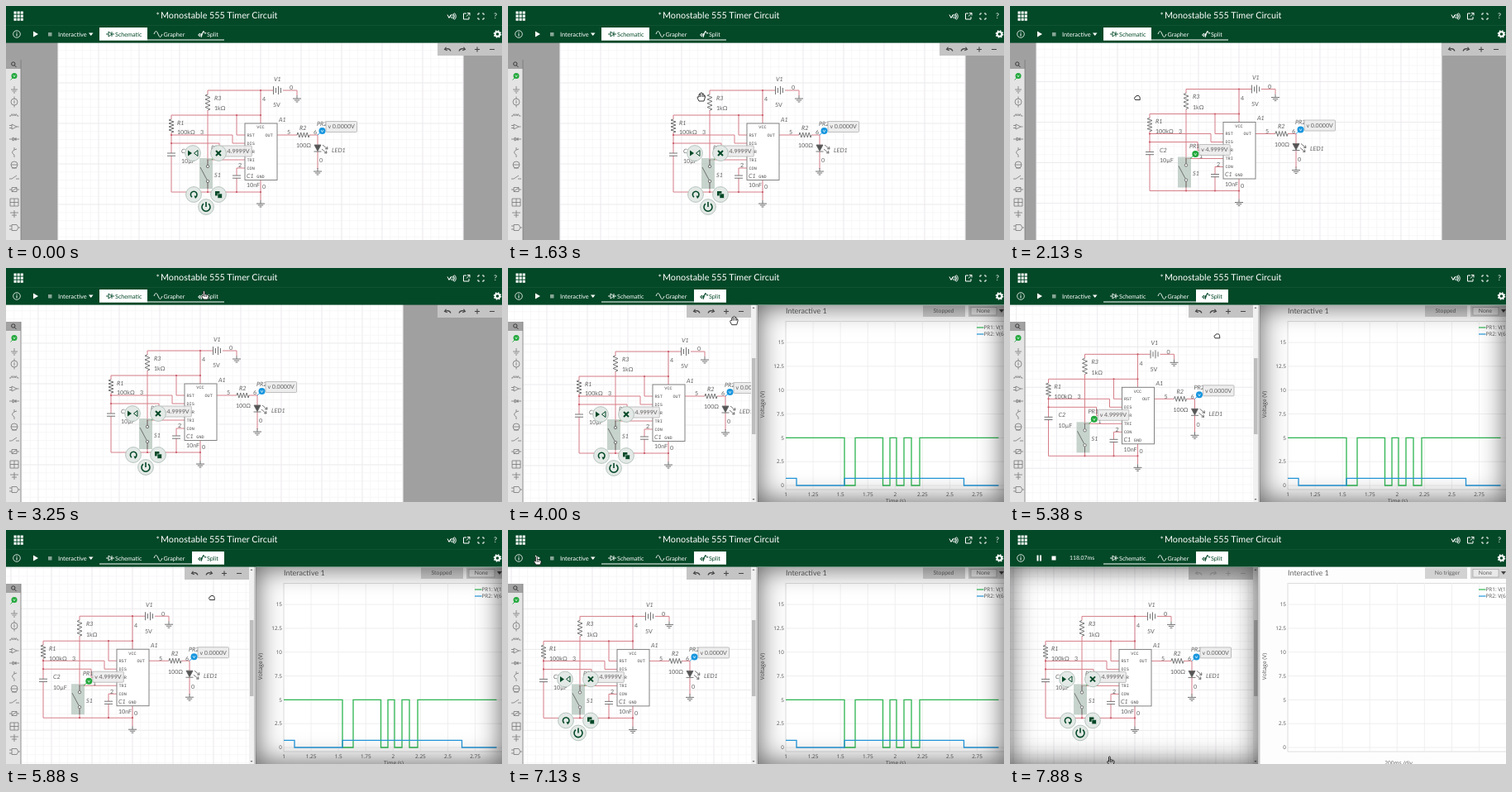
Write an HTML page that moves like this. It is 600 px wide and 283 px high and loops after 8000 ms.

```html
<!DOCTYPE html>
<html lang="en">
<head>
<meta charset="utf-8">
<title>Monostable 555 Timer Circuit</title>
<style>
  html, body { margin: 0; width: 100%; height: 100%; overflow: hidden; background: #a0a0a0; }
  svg { display: block; width: 100vw; height: 100vh; }
  text { font: 7.3px Lato, "Open Sans", sans-serif; fill: #626262; text-rendering: geometricPrecision; }
  .name { font-style: italic; }
  .pin { font: 5.2px "Liberation Mono", "DejaVu Sans Mono", monospace; fill: #4c4c4c; }
  .tick { font: 6.4px "Open Sans", Lato, sans-serif; fill: #555; }
  .light { fill: #fff; }
  .line { fill: none; stroke: #666; stroke-width: .9; }
  .wire { fill: none; stroke: #d67f89; stroke-width: 1; }
  .icon { fill: none; stroke: #fff; stroke-width: 1; }
  .part { fill: none; stroke: #777; stroke-width: .8; }
  .tool { fill: none; stroke: #444; stroke-width: 1.1; }
  .run .tool { stroke: #a4a4a4; }
  .button { fill: #e3e9e6; stroke: #a9b9b1; stroke-width: .8; }
  .mark { fill: none; stroke: #034827; stroke-width: 1.6; }
  .dark { fill: #034827; }
  .tab rect { fill: none; }
  .tab text { fill: #fff; }
  .tab path { fill: none; stroke: #fff; stroke-width: .9; }
  .tab.on rect { fill: #fff; }
  .tab.on text { fill: #034827; }
  .tab.on path { stroke: #034827; }
  .hand path { fill: #fff; stroke: #222; stroke-width: .9; stroke-linejoin: round; }
  .drag .menu, svg:not(.split) .graph, svg:not(.split) + .shade,
  .run .idle, svg:not(.run) .busy { display: none; }
  /* The pane without focus is shaded along its edges. */
  .shade { position: absolute; left: 302px; right: 0; top: 44.5px; bottom: 0;
    box-shadow: inset 0 0 32px rgba(0, 0, 0, .65); }
  .run + .shade { left: 0; right: 300px; }
</style>
</head>
<body>
<svg id="stage" viewBox="0 0 600 283"></svg>
<div class="shade"></div>
<script>
const stage = document.getElementById('stage');
const LOOP = 8000, STEP = 125;
const SPLIT_AT = 3500, RUN_AT = 7375;

// Markup helpers; text is centred vertically on y.
const text = (x, y, s, cls = '', size = 7.3, anchor = 'start') =>
  `<text x="${x}" y="${y + size * .35}" class="${cls}" text-anchor="${anchor}" style="font-size:${size}px">${s}</text>`;
const path = (d, cls, extra = '') => `<path d="${d}" class="${cls}" ${extra}/>`;
const rect = (x, y, w, h, fill, extra = '') =>
  `<rect x="${x}" y="${y}" width="${w}" height="${h}" fill="${fill}" ${extra}/>`;
const disc = (x, y, r, fill, extra = '') => `<circle cx="${x}" cy="${y}" r="${r}" fill="${fill}" ${extra}/>`;
const group = (cls, body, extra = '') => `<g class="${cls}" ${extra}>${body}</g>`;
const range = (n, f) => Array.from({ length: n }, (_, i) => f(i)).join('');

function resistor(x, y, length, vertical) {
  const step = length / 8;
  let d = `M${x} ${y}`;
  for (let i = 0; i < 8; i++) {
    const along = (i + .5) * step, side = i % 2 ? 3 : -3;
    d += vertical ? `L${x + side} ${y + along}` : `L${x + along} ${y + side}`;
  }
  return path(d + (vertical ? `L${x} ${y + length}` : `L${x + length} ${y}`), 'line');
}

const ground = (x, y) =>
  path(`M${x} ${y - 4}V${y}M${x - 5} ${y}h10M${x - 3.2} ${y + 2}h6.4M${x - 1.4} ${y + 4}h2.8`, 'line');

const capacitor = (x, y) => path(`M${x - 5} ${y}h10M${x - 5} ${y + 3.2}h10`, 'line');

function probe(x, y, tipX, tipY, color, value) {
  const tag = rect(x + 4.5, y - 11.5, 37.5, 13, '#ececec', 'fill-opacity=".9" stroke="#aaa" stroke-width=".7" rx="1"');
  return path(`M${x} ${y}L${tipX} ${tipY}`, 'line', `style="stroke:${color}"`) + tag +
    text(x + 7, y - 5, `v ${value}`, '', 7.1) + disc(x, y, 4, color) +
    path(`M${x - 1.4} ${y - 1}l1.4 2.6l1.4 -2.6`, 'icon', 'style="stroke-width:.7"');
}

function page() {
  const cell = 9.8;
  const lines = (every, color) => {
    let d = '';
    for (let i = 0; i <= 50; i += every) d += `M${63 + i * cell} -60V400`;
    for (let y = -5; y < 400; y += cell * every) d += `M63 ${y}H553`;
    return path(d, '', `stroke="${color}" stroke-width=".7"`);
  };
  return rect(63, -60, 490, 460, '#fff') + lines(1, '#f6f4f6') + lines(5, '#e9e7ea');
}

function circuit() {
  const wires = path('M323 102H244V107M308 102V142M200 132H308M279 132V156H289M200 132V137' +
    'M244 126V192M244 186H289M200 153V178M200 156H274V166H289M200 166H258V176H289' +
    'M200 181V225H308M308 210V235M289 196H279V205M279 208V225M244 214V225' +
    'M328 156H352M367 156H377V168M377 176V197M335 102H352V108', 'wire');
  const dots = [[308, 102], [308, 132], [279, 132], [200, 156], [200, 166], [244, 186], [279, 225], [244, 225], [308, 225]]
    .map(([x, y]) => disc(x, y, 1.1, '#cc5a68')).join('');
  const parts = resistor(244, 107, 19, true) + resistor(200, 137, 16, true) + resistor(352, 156, 15, false) +
    capacitor(200, 178) + capacitor(279, 205) +
    ground(352, 112) + ground(308, 239) + ground(377, 200) +
    path('M323.5 97V107M326.5 99V105M329.5 97V107M332.5 99V105', 'line') +
    path('M373 168H381L377 175.5ZM372.5 176H381.5', 'line', 'style="fill:#555"') +
    path('M383 168l6 5m-3 -.3l3 .3l-.5 -3M382 173l6 5m-3 -.3l3 .3l-.5 -3', 'line');
  const chip = rect(289, 142, 39, 68.5, '#fff', 'stroke="#777" stroke-width=".9"') +
    ['RST', 'DIS', 'THR', 'TRI', 'CON'].map((s, i) => text(291.5, 156 + i * 10, s, 'pin', 5.2)).join('') +
    text(308, 146.5, 'VCC', 'pin', 5.2, 'middle') + text(308, 206, 'GND', 'pin', 5.2, 'middle') +
    text(313.5, 156, 'OUT', 'pin', 5.2);
  const toggle = rect(234, 184, 16, 37, '#a9bdb2', 'fill-opacity=".65"') +
    path('M235 195L243 210M244 186V192M244 214V221', 'line') +
    disc(244, 194, 1.7, '#fff', 'stroke="#555" stroke-width=".8"') +
    disc(244, 212, 1.7, '#fff', 'stroke="#555" stroke-width=".8"');
  const names = [[324, 88, 'V1'], [252, 111, 'R3'], [207, 141, 'R1'], [212, 175.5, 'C2'], [252, 204, 'S1'],
    [291, 205, 'C1'], [330, 137, 'A1'], [355, 147, 'R2'], [394, 174, 'LED1'], [376, 142, 'PR2'], [248, 171, 'PR1']]
    .map(([x, y, s]) => text(x, y, s, 'name')).join('');
  const values = [[323, 120, '5V'], [252, 124, '1kΩ'], [207, 153, '100kΩ'], [212, 188, '10µF'], [291, 217, '10nF'],
    [351, 169, '100Ω'], [343, 99, '0'], [310, 113, '4'], [235, 153, '3'], [340, 153, '5'], [372, 153, '6'],
    [281, 193, '2'], [310, 219, '0'], [379, 187, '0'], [260, 183, '1']]
    .map(([x, y, s]) => text(x, y, s, '', 7.1)).join('');
  return wires + dots + parts + chip + toggle + names + values +
    probe(255.3, 180.5, 249, 186, '#22a83c', '4.9999V') +
    probe(382.5, 151, 377, 156, '#1796de', '0.0000V');
}

function menu() {
  const base = [[226, 178], [257, 178], [227, 228], [257, 228], [242, 243]]
    .map(([x, y]) => disc(x, y, 9.4, '', 'class="button"')).join('');
  return group('menu', base +
    path('M220 174.5V181.5L225 178Z', 'dark') + path('M232 174.5V181.5L227.5 178Z', 'mark', 'style="stroke-width:1"') +
    path('M254 175l6 6M260 175l-6 6', 'mark', 'style="stroke-width:2"') +
    path('M225 231.2A3.8 3.8 0 1 1 229.4 231.2', 'mark') + path('M227.5 229.5l4 .4l-2.4 3.2Z', 'dark') +
    rect(253, 224, 5.4, 5.4, '#034827') + rect(256, 227, 5.4, 5.4, '#034827', 'stroke="#e3e9e6" stroke-width=".6"') +
    path('M239 239.2A5 5 0 1 0 245 239.2M242 237V243', 'mark'));
}

function sidebar() {
  const shapes = ['M10 97v4M6 101h8M7.5 103h5M9 105h2', 'M10 109.5v3M10 119.5v3M6 116a4 4 0 1 0 8 0a4 4 0 1 0 -8 0M10 114v4',
    'M4 133h2q1 -5 2.5 0q1 -5 2.5 0q1 -5 2.5 0h2', 'M4 144.5h3M4 147.5h3M7 143l6 3l-6 3zM13 146h2.5',
    'M4 161h12M8 159v4l4 -2zM12 159v4', 'M10 171v3q-5 3 0 6v3M10 174l3 -1',
    'M6 192a4 4 0 1 0 8 0a4 4 0 1 0 -8 0M6 192h8M7 196h6', 'M4 209h3l6 -4M12 209h4', 'M4 222h3M13 222h3M7 219.5h6v5h-6zM7 224l6 -4',
    'M5 233h10v9h-10zM5 237.5h10M10 233v9', 'M5 250h10M7 253h6M10 247v9', 'M4 266h3M4 270h3M7 264.5h6l2 3.5l-2 3.5h-6zM15 268h2'];
  return group('idle', rect(0, 65, 18, 218, '#e4e4e4') + rect(0, 65, 18, 11, '#a2a2a2') + path('M18 65V283', 'part') +
    path('M10 71.5l2.5 2.5M11 70a2.2 2.2 0 1 1 -4.4 0a2.2 2.2 0 1 1 4.4 0', 'line', 'style="stroke:#333"') +
    path('M8 87l-2.500 2.500M8.500 84l1.500 2.500l1.500 -2.500', 'line', 'style="stroke:#22a83c"') +
    disc(10, 84.5, 3.5, '#22a83c') + path('M8.7 83.5l1.300 2.300l1.300 -2.300', 'icon', 'style="stroke-width:.7"') +
    shapes.map(d => path(d, 'part')).join(''));
}

const viewTools = () => group('', rect(522, 44.5, 78, 15.5, '#c4c4c4') +
  path('M538 54.5q-1.5 -4 -6.5 -2.5M532.5 49.7l-2 2.8l3.3 1.2', 'tool') +
  path('M548 54.5q1.5 -4 6.5 -2.5M553.5 49.7l2 2.8l-3.3 1.2', 'tool') +
  path('M567 52.5h6M570 49.5v6M585 52.5h6', 'tool'), 'id="tools"');

function graph() {
  const X = v => 336 + (v - 1) * 132.3, Y = v => 263 - v * 11.53;
  const levels = range(7, i => path(`M336 ${Y(i * 2.5)}H600`, '', 'stroke="#eaeaea" stroke-width=".8"') +
    text(334, Y(i * 2.5), i * 2.5, 'tick', 6.4, 'end'));
  const columns = range(8, i => path(`M${X(1 + i / 4)} 64V268`, '', 'stroke="#ececec" stroke-width=".8"'));
  const times = range(8, i => text(X(1 + i / 4), 274, 1 + i / 4, 'tick', 6.4, 'middle'));
  // Square wave starting high, flipping at each listed x.
  const wave = (high, flips, color) => {
    let level = high, d = `M336 ${high}`;
    for (const x of flips) d += `H${x}V${level = level === high ? 263 : high}`;
    return path(d + 'H593.5', '', `fill="none" stroke="${color}" stroke-width="1.3"`);
  };
  const key = (y, color, label) =>
    path(`M567 ${y}h8.5`, '', `stroke="${color}" stroke-width="1.2"`) + text(575.5, y, label, 'tick', 6.4);
  return group('graph', rect(294, 44, 6.5, 239, '#f1f1f1') + rect(295, 109, 4.5, 92, '#bdbdbd') +
    path('M295.500 49h3l-1.500 -2zM295.500 279h3l-1.500 2z', '', 'fill="#777"') +
    rect(300, 44, 300, 239, '#fdfdfd') + rect(300, 44, 2.5, 239, '#c9c9c9') +
    rect(336, 64.5, 270, 203.5, '#fff', 'stroke="#d4d4d4" stroke-width=".8"') + levels + columns +
    text(336, 52, 'Interactive 1', '', 9) +
    rect(502, 45.5, 51, 13.5, '#d2d2d2') + rect(557, 45.5, 43, 13.5, '#d2d2d2') +
    rect(560, 47.5, 31, 9.5, '#e9e9e9', 'stroke="#999" stroke-width=".6"') +
    text(575, 52, 'None', '', 6.8, 'middle') + path('M594 50h6l-3 4z', '', 'fill="#444"') +
    `<g transform="translate(308 165) rotate(-90)">${text(0, 0, 'Voltage (V)', 'tick', 6.6, 'middle')}</g>` +
    group('idle', times + wave(205.3, [407, 420, 453.5, 462, 470, 479, 488, 498], '#2db550') +
      wave(254.3, [349, 407, 551.5], '#2296da') +
      text(469, 282, 'Time (s)', 'tick', 6.6, 'middle') + text(527, 52, 'Stopped', '', 6.8, 'middle')) +
    group('busy', text(470, 282, '200ms /div', 'tick', 6.6, 'middle') + text(529, 52, 'No trigger', '', 6.8, 'middle')) +
    key(72, '#2db550', 'PR1: V(1)') + key(80, '#2296da', 'PR2: V(6)'));
}

function header() {
  const tab = (id, x, w, icon, label, labelX) =>
    group('tab', rect(x, 26, w, 15.5, '') + path(icon, '') + text(labelX, 34, label, '', 7.2), `id="${id}"`);
  return rect(0, 0, 600, 44.6, '#034827') + path('M0 23.5H600', '', 'stroke="#155637" stroke-width=".8"') +
    range(9, i => rect(9.5 + i % 3 * 4.1, 6.5 + Math.floor(i / 3) * 4.1, 3.1, 3.1, '#fff')) +
    text(181.5, 11.7, '*', 'light', 10) + text(187, 11.7, 'Monostable 555 Timer Circuit', 'light', 10.8) +
    path('M534 10.5l2 4l2 -4M541 12.5a1.500 2 0 1 1 -3 0a1.500 2 0 1 1 3 0M541 9q3 3.500 0 7M542.500 8.500q3.500 4 0 8', 'icon') +
    path('M557 9H553.5V16H560V13M557 12.5L561 8.5M558 8.5h3v3', 'icon') +
    path('M571 11V9h2M576 9h2v2M578 14v2h-2M573 16h-2v-2', 'icon') + text(590, 12, '?', 'light', 9) +
    disc(13, 34, 4.3, 'none', 'stroke="#fff" stroke-width=".8"') + path('M13 33.2V36.5M13 31.4v1', 'icon') +
    disc(594.5, 34, 2.8, 'none', 'stroke="#fff" stroke-width="2"') +
    disc(594.5, 34, 4.1, 'none', 'stroke="#fff" stroke-width="1.4" stroke-dasharray="1.61 1.61"') +
    group('idle', path('M33 30.5V37.5L39 34Z', 'light') + rect(51, 32, 4.5, 4.5, '#87a596') +
      text(63, 34, 'Interactive', 'light', 7.4) + path('M100 32.5h5.5l-2.75 3.5z', 'light')) +
    group('busy', rect(32.5, 30.5, 2, 7, '#fff') + rect(36, 30.5, 2, 7, '#fff') + rect(50.5, 31.5, 5, 5, '#fff') +
      `<text id="clock" x="72" y="36.3" class="light" style="font-size:6.9px"></text>`) +
    path('M113 41H264', 'icon') +
    tab('schematic', 113, 58, 'M121 34h3M128 34h3M124 31v6l4 -3zM128 31v6', 'Schematic', 132) +
    tab('grapher', 173, 50, 'M179 34q2.5 -7 5 0t5 0', 'Grapher', 190.5) +
    tab('split', 225, 39, 'M232 35h2M234 33v4l2.5 -2zM236.5 33v4M239 30l-3 8M237.5 33q1.5 -4 2.5 -1t2 0', 'Split', 243);
}

const hands = {
  open: 'M-3 5L-5 1Q-5 -1 -3 0L-3 -3Q-2 -5 -1.3 -3V-4.5Q0 -6 1 -4.5V-3.5Q2.3 -5 3 -3V-1.5Q4.5 -2.5 4.5 0L3 5ZM-1.3 -3V0M1 -3.5V0M3 -2V0',
  fist: 'M-2.5 2.5L-3.5 .5Q-3.5 -1 -2 -1Q-1.5 -3 0 -2.5Q2.500 -3 3 -1L3.3 2.5Z',
  point: 'M-2 5L-4.5 1.5Q-4.5 0 -2.5 1V-4.5Q-1.5 -6 -.7 -4.5V-1Q.6 -2 1.3 -.7Q2.6 -1.5 3 0Q4.5 0 4 2L3 5ZM-.7 -1V2M1.3 -.5V2'
};

stage.innerHTML = rect(0, 0, 600, 283, '#a0a0a0') +
  group('', page() + circuit() + menu(), 'id="sheet"') + sidebar() + graph() + viewTools() + header() +
  group('hand', path('', ''), 'id="cursor"');

const byId = id => document.getElementById(id);
const sheet = byId('sheet'), cursor = byId('cursor'), tools = byId('tools'), clock = byId('clock');

// Keys are [time, x, y]; positions are linear in between.
const pan = [[0, 0, 0], [1875, 0, 0], [2125, -31, -1.5], [2500, -73, -2], [3375, -73, -2], [3500, -114, -1],
  [4500, -114, -1], [4875, -144.4, 3.5], [5375, -153.5, 2.3], [5875, -155, 2.2], [6125, -157, 2.4], [LOOP, -157, 2.4]];
const pointer = [[1000, 243, 196], [1375, 237, 130], [1625, 234, 110], [1875, 185, 112], [2125, 154, 111], [2500, 112, 110],
  [2750, 120, 104], [3250, 241, 33], [3500, 241, 33], [4250, 290, 79], [4500, 290, 79], [4875, 259.5, 83],
  [5375, 250.5, 82.3], [5875, 249, 82], [6125, 247, 82], [6375, 240, 80], [7000, 36, 37], [7375, 36, 37], [7875, 122, 279], [LOOP, 122, 279]];
const poses = [[1000, 'open'], [1875, 'fist'], [2625, 'open'], [3125, 'point'], [3750, 'open'],
  [4500, 'fist'], [6250, 'open'], [6875, 'point']];

function at(keys, t) {
  const i = keys.findIndex(k => k[0] > t);
  if (i < 1) return keys[i < 0 ? keys.length - 1 : 0].slice(1);
  const [a, b] = [keys[i - 1], keys[i]], u = (t - a[0]) / (b[0] - a[0]);
  return [a[1] + (b[1] - a[1]) * u, a[2] + (b[2] - a[2]) * u];
}

function draw(now) {
  const t = Math.floor(now % LOOP / STEP) * STEP;
  const split = t >= SPLIT_AT;
  const pose = poses.filter(p => p[0] <= t).pop();
  stage.classList.toggle('split', split);
  stage.classList.toggle('run', t >= RUN_AT);
  stage.classList.toggle('drag', !!pose && pose[1] === 'fist');
  byId('schematic').classList.toggle('on', !split);
  byId('split').classList.toggle('on', split);
  tools.setAttribute('transform', `translate(${split ? -306 : 0} 0)`);
  sheet.setAttribute('transform', `translate(${at(pan, t)})`);
  cursor.setAttribute('transform', `translate(${at(pointer, t)})`);
  cursor.firstChild.setAttribute('d', pose ? hands[pose[1]] : '');
  clock.textContent = (Math.max(0, t - RUN_AT) / 500 * 118.07).toFixed(2) + 'ms';
}

const start = performance.now();
function tick() {
  draw(performance.now() - start);
  requestAnimationFrame(tick);
}
tick();
</script>
</body>
</html>
```
